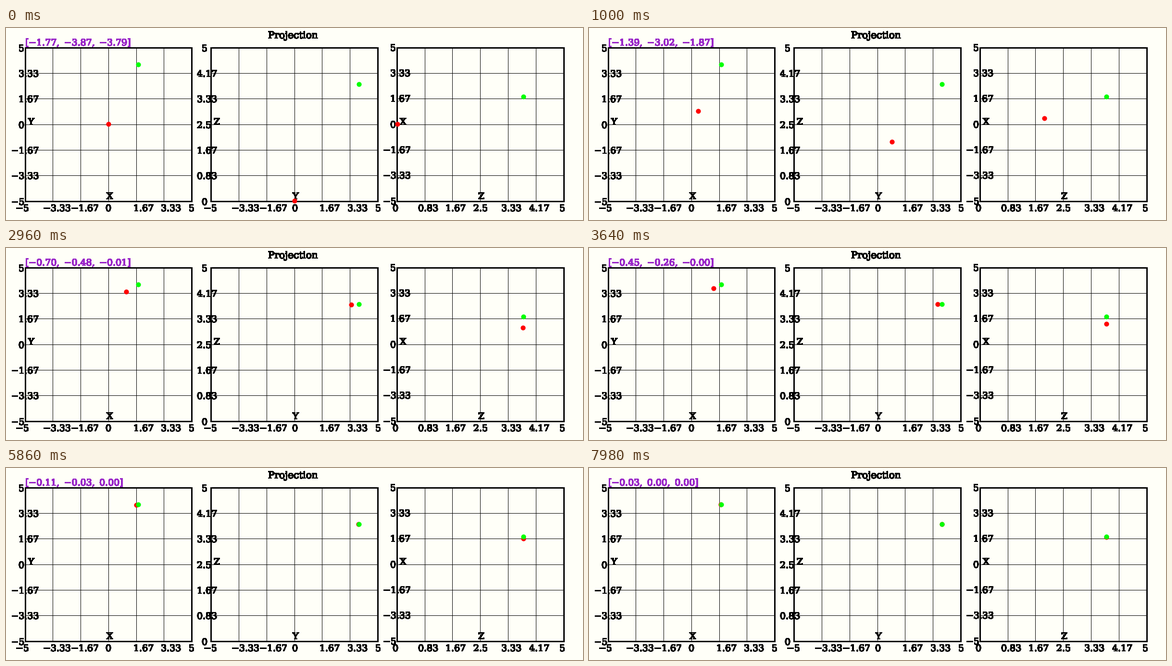
Animation, 1200 px wide and 400 px high, one loop 8 s. Source, as a matplotlib script:

```python
import numpy as np
import matplotlib.pyplot as plt
from matplotlib.animation import FuncAnimation
from matplotlib.patches import Circle, PathPatch
from matplotlib.path import Path
from matplotlib.textpath import TextPath

W, H, DPI = 1200, 400, 100
STEP, FRAMES = 20, 400
PX = 72 / DPI
INK, PURPLE, PAPER = "#000000", "#9a28c8", "#fffff8"
FONT = {"family": "DejaVu Serif"}
SIZE, TITLE_SIZE = 18.9, 20

fig = plt.figure(figsize=(W / DPI, H / DPI), dpi=DPI, facecolor=PAPER)
ax = fig.add_axes([0, 0, 1, 1])
# whole numbers address pixels once lines are snapped
ax.set_xlim(0, W)
ax.set_ylim(H - 1, -1)
ax.axis("off")


# ---- drawing helpers ----
def lettering(text, x, y, size=SIZE):
    """Outline of a text whose baseline starts at (x, y)."""
    text = text.replace("-", "\u2212").replace(" ", "\u2002")
    shape = TextPath((0, 0), text, size=size, prop=FONT)
    return Path(shape.vertices * [1, -1] + [x, y + 0.5], shape.codes)


def draw_text(paths, color=INK):
    return ax.add_patch(PathPatch(Path.make_compound_path(*paths), facecolor=color,
                                  edgecolor=color, lw=0.8 * PX, antialiased=False))


def draw_lines(paths, width):
    ax.add_patch(PathPatch(Path.make_compound_path(*paths), fill=False, edgecolor=INK,
                           lw=width * PX, capstyle="projecting", joinstyle="miter",
                           antialiased=False, snap=True))


# ---- three projections ----
TOP, BOTTOM = 40, 360
PANEL_W, GAP = 1040 / 3, 40
LEFTS = [GAP + i * (PANEL_W + GAP) for i in range(3)]
PAIRS = ["XY", "YZ", "ZX"]
LIMITS = {"X": (-5, 5), "Y": (-5, 5), "Z": (0, 5)}

# how far a label starts left of its tick: whole number, decimal, negative
COLUMN_SHIFT = [(6, 6, 20), (5, 5, 15), (9, 14, 14)]
ROW_SHIFT = [(14, 14, 29.5), (19, 29, 29), (14, 14, 29)]


def kind(text):
    return 2 if text[0] == "-" else int("." in text)


def tick_texts(axis):
    return [f"{round(v, 2) + 0.0:g}" for v in np.linspace(*LIMITS[axis], 7)]


grid, frame = [], []
words = [lettering("Projection", 545, 20, TITLE_SIZE)]
for i, (left, (h, v)) in enumerate(zip(LEFTS, PAIRS)):
    xs = np.floor(np.linspace(left, left + PANEL_W, 7) + 1e-6)
    ys = np.floor(np.linspace(BOTTOM, TOP, 7) + 1e-6)
    x0, x1 = xs[0], xs[-1]
    grid += [Path([(x, TOP), (x, BOTTOM)]) for x in xs]
    grid += [Path([(x0, y), (x1, y)]) for y in ys]
    frame.append(Path([(x0, TOP), (x1, TOP), (x1, BOTTOM), (x0, BOTTOM), (x0, TOP)]))

    for x, text in zip(xs, tick_texts(h)):
        words.append(lettering(text, x - COLUMN_SHIFT[i][kind(text)], 380))
    drop = 6 if i == 2 else 7
    for y, text in zip(ys, tick_texts(v)):
        words.append(lettering(text, x0 - ROW_SHIFT[i][kind(text)], y + drop))
    words.append(lettering(h, xs[3] - 4, 355))
    words.append(lettering(v, x0 + 6, 200))

draw_lines(grid, 1)
draw_lines(frame, 3)
draw_text(words)
readout = draw_text([lettering("[]", 40, 35)], PURPLE)


def make_dots(color):
    return [ax.add_patch(Circle((0, 0), 5.1, facecolor=color, edgecolor="none", zorder=3))
            for _ in PAIRS]


def place(dots, point):
    pos = dict(zip("XYZ", point))
    for dot, left, (h, v) in zip(dots, LEFTS, PAIRS):
        x = np.interp(pos[h], LIMITS[h], (left, left + PANEL_W))
        y = np.interp(pos[v], LIMITS[v], (BOTTOM, TOP))
        dot.center = (round(x) + 0.5, round(y) - 0.5)


red, green = make_dots("#ff0000"), make_dots("#00ff00")
GOAL = np.array([1.77, 3.87, 3.79])
place(green, GOAL)

# ---- motion: each axis waits, then closes its gap exponentially ----
RATE = np.array([0.0311, 0.0436, 0.19])
DELAY = np.array([14.2, 16.3, 19.3])
SOFT = np.array([1, 1, 3])
STALL = np.array([20, 0, 13.4])
OVERSHOOT = np.array([0, 0.005, 1e-5])


def gap(k):
    run = SOFT * np.log1p(np.exp((k - DELAY) / SOFT))
    pause = STALL * np.clip((k - 44) / 20, 0, 1)
    return OVERSHOOT - (GOAL + OVERSHOOT) * np.exp(-RATE * (run - pause))


def sim_step(ms):
    # three updates every 140 ms, the second one is held longer
    cycle, rest = divmod(ms, 140)
    return 3 * cycle + (rest >= 20) + (rest >= 120)


def update(n):
    error = gap(sim_step(n * STEP))
    place(red, GOAL + error)
    text = "[" + ", ".join(f"{e:.2f}" for e in error) + "]"
    readout.set_path(lettering(text, 40, 35))
    return [readout, *red, *green]


anim = FuncAnimation(fig, update, frames=FRAMES, interval=STEP, repeat=True,
                     repeat_delay=0, blit=False)
plt.show()
```
